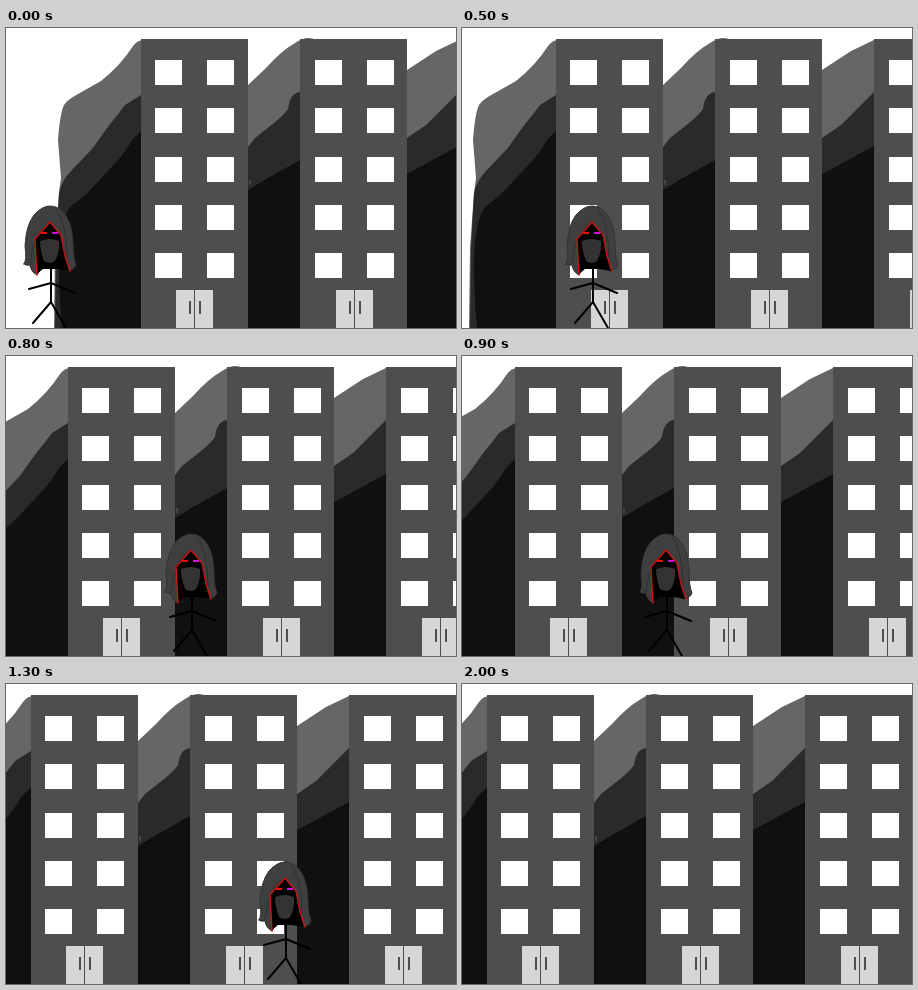
Write an HTML page with a canvas that moves like this. It is 450 by 300 pixels and loops after 2100 ms.

```html
<!DOCTYPE html>
<html>
<head>
<meta charset="utf-8">
<style>
html, body { margin: 0; width: 100%; height: 100%; overflow: hidden; background: #fff; }
canvas { display: block; }
</style>
</head>
<body>
<canvas id="stage" width="450" height="300"></canvas>
<script>
const ctx = document.getElementById('stage').getContext('2d');
const LOOP = 2100, STEP = 100;

// Keys are [step, x]; the scene scrolls left while the figure walks right.
const sceneKeys = [[0, 135], [3, 112], [6, 85], [8, 62], [11, 35], [12, 33], [13, 25]];
const walkerKeys = [[0, 45], [3, 96], [6, 149], [8, 186], [11, 243], [15, 317]];

// Hills are drawn relative to the left edge of the first building.
const hills = [
  ['#666', 'M-87 300L-86 220L-82 165L-80 150L-83 112Q-81 85 -77 77Q-74 72 -63 66L-40 53Q-20 37 -8 18Q-3 11 4 12V300Z' +
    'M107 300V57L125 40Q140 23 154 15Q166 7 175 12V300ZM266 300V42L295 23L318 12V300Z'],
  ['#2a2a2a', 'M-86 300L-85 220L-82 165Q-79 152 -70 143L-49 121L-31 96Q-24 88 -16 77L0 67V300Z' +
    'M107 300V119L114 110L133 95Q143 87 147 81Q149 65 159 64V300ZM266 300V110L285 97L300 82L318 64V300Z'],
  ['#101010', 'M-79 300Q-85 230 -79 200Q-76 184 -69 177Q-58 170 -48 159L-22 131Q-14 121 -9 112L0 103V300Z' +
    'M107 300V162L125 151L159 132V300ZM266 300V146L318 118V300Z']
].map(([color, d]) => [color, new Path2D(d)]);

// Figure parts are drawn relative to its spine.
const hood = new Path2D('M-27 236Q-24 232 -26 218Q-25 197 -17 187Q-9 178 -1 178Q9 178 15 188Q21 196 22 215' +
  'Q22 230 25 237Q24 241 18 243L10 240L-10 240L-14 247Q-20 244 -21 237Q-25 238 -27 236Z');
const opening = new Path2D('M-14 246L-16 210L-1 194L10 208L18 243L6 241L-8 241Z');
const trim = new Path2D('M-14 247L-16 211L-1 194L10 207L14 228L19 243');
const mask = new Path2D('M-11 213Q-1 209 8 213Q9 224 4 233Q-1 237 -7 233Q-11 223 -11 213Z');
const folds = new Path2D('M-1 193Q-18 204 -21 236M5 181Q16 196 16 230');
const limbs = new Path2D('M0 240V274M-22 261L0 255L24 265M-18 295L0 274L15 300');

function at(keys, n) {
  for (let i = 1; i < keys.length; i++) {
    const [a, x] = keys[i - 1], [b, y] = keys[i];
    if (n <= b) return Math.round(x + (y - x) * (n - a) / (b - a));
  }
  return keys[keys.length - 1][1];
}

function rect(color, x, y, w, h) {
  ctx.fillStyle = color;
  ctx.fillRect(x, y, w, h);
}

function fill(color, path) {
  ctx.fillStyle = color;
  ctx.fill(path);
}

function stroke(color, width, path) {
  ctx.strokeStyle = color;
  ctx.lineWidth = width;
  ctx.stroke(path);
}

function building(i) {
  const x = 159 * i, inner = x + (i ? 1 : 0);
  rect('#4e4e4e', x, 11, 107, 289);
  for (let row = 0; row < 5; row++)
    for (const col of [14, 66]) rect('#fff', inner + col, Math.round(32 + row * 48.3), 27, 25);
  rect('#d6d6d6', inner + 35, 262, 37, 38);
  rect('#4e4e4e', inner + 53, 262, 1, 38);
  for (const col of [48, 58]) rect('#4e4e4e', inner + col, 273, 2, 13);
}

function walker(n) {
  const body = Math.min(1, Math.max(0, (18 - n) / 3));
  const glow = Math.min(1, Math.max(0, (20 - n) / 2));
  ctx.lineCap = ctx.lineJoin = 'round';
  ctx.globalAlpha = body;
  stroke('#000', 2, limbs);
  fill('#3f3f3f', hood);
  stroke('#333', 1, hood);
  stroke('#303030', 1, folds);
  fill('#000', opening);
  fill('#333', mask);
  ctx.globalAlpha = glow;
  stroke('#d01414', 1.3, trim);
  rect('#f01010', -10, 204, 6, 2);
  rect('#d010e0', 1, 204, 6, 2);
  ctx.globalAlpha = 1;
}

function draw(now) {
  const n = Math.floor(now % LOOP / STEP);
  rect('#fff', 0, 0, 450, 300);
  ctx.save();
  ctx.translate(at(sceneKeys, n), 0);
  for (const [color, path] of hills) fill(color, path);
  rect('#444', 108, 152, 2, 5);
  for (let i = 0; i < 3; i++) building(i);
  ctx.restore();
  ctx.save();
  ctx.translate(at(walkerKeys, n), 0);
  walker(n);
  ctx.restore();
}

const start = performance.now();
function tick() {
  draw(performance.now() - start);
  requestAnimationFrame(tick);
}
tick();
</script>
</body>
</html>
```
